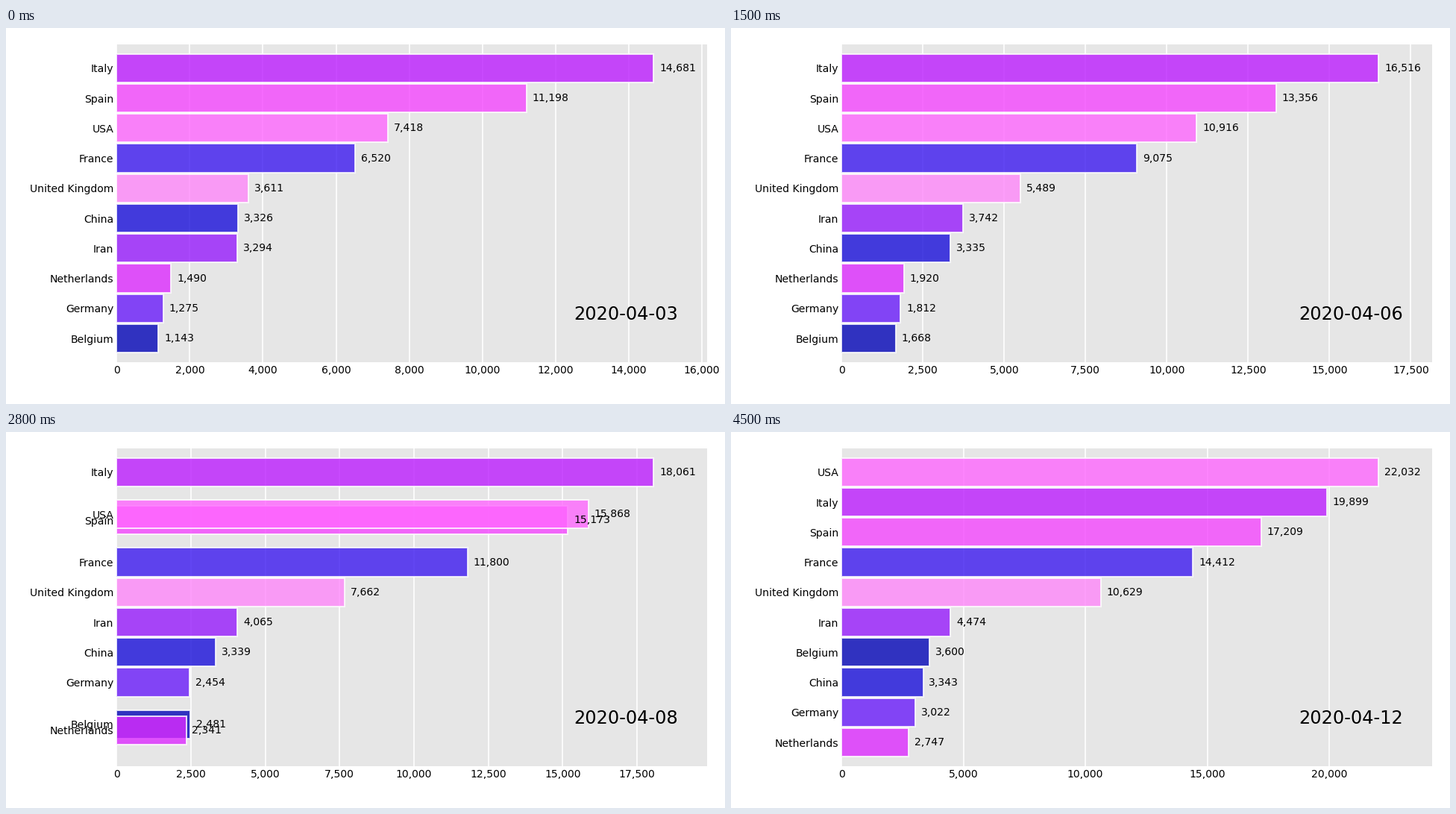
Write a matplotlib script that moves like this. It is 964 px wide and 504 px high and loops after 4550 ms.

```python
import numpy as np
import matplotlib.pyplot as plt
from matplotlib.animation import FuncAnimation
from matplotlib.ticker import FixedFormatter, StrMethodFormatter

WIDTH, HEIGHT, DPI = 964, 504, 144
DAYS, STEPS = 10, 10  # days shown, frames per day
FIRST_DAY = 3

# Name, bar colour, first and last value, bulge and swing of the growth curve.
COUNTRIES = [
    ("Belgium", "#0305b7", 1143, 3600, -264, -76),
    ("China", "#190fda", 3326, 3343, 3, 1),
    ("France", "#3c19f0", 6520, 14412, 199, -286),
    ("Germany", "#691cfa", 1275, 3022, 37, -89),
    ("Iran", "#961cfc", 3294, 4474, 50, 13),
    ("Italy", "#bc1dff", 14681, 19899, 131, -21),
    ("Netherlands", "#dc2bff", 1490, 2747, 49, -36),
    ("Spain", "#f446ff", 11198, 17209, 224, -46),
    ("USA", "#ff67ff", 7418, 22032, -1073, -513),
    ("United Kingdom", "#ff87fa", 3611, 10629, -424, -109),
]

# Day on which a country has climbed, and how many places.
CLIMBS = [
    (1, "Iran", 1), (4, "Belgium", 1), (5, "Germany", 2), (6, "USA", 1),
    (6, "Belgium", 1), (7, "Belgium", 1), (8, "USA", 1), (8, "Belgium", 1),
]

names = [row[0] for row in COUNTRIES]
colors = [row[1] for row in COUNTRIES]
count = len(names)
total = (DAYS - 1) * STEPS + 1


def growth(first, last, bulge, swing):
    """Daily values: a straight rise bent by two sine waves."""
    t = np.linspace(0, 1, DAYS)
    return (first + (last - first) * t
            + bulge * np.sin(np.pi * t) + swing * np.sin(2 * np.pi * t))


def daily_ranks(start_values):
    """Row of every country on every day; the top row is the highest."""
    order = [names[k] for k in np.argsort(start_values)]
    ranks = np.empty((count, DAYS))
    for day in range(DAYS):
        for when, name, places in CLIMBS:
            if when == day:
                spot = order.index(name)
                order.insert(spot + places, order.pop(spot))
        ranks[:, day] = [order.index(name) + 1 for name in names]
    return ranks


def at_frame(table, i):
    """Linear interpolation between days for every country."""
    keys = np.arange(DAYS) * STEPS
    return np.array([np.interp(i, keys, row) for row in table])


data = np.array([growth(*row[2:]) for row in COUNTRIES])
ranks = daily_ranks(data[:, 0])

fig = plt.figure(figsize=(6.6945, 3.5), dpi=DPI, facecolor="white")
left, right, top, bottom = 148.25, 940.42, 21.62, 448.2
ax = fig.add_axes([left / WIDTH, 1 - bottom / HEIGHT,
                   (right - left) / WIDTH, (bottom - top) / HEIGHT])
ax.set_facecolor("0.9")
ax.grid(True, axis="x", color="white", lw=0.8)
ax.set_axisbelow(True)
ax.tick_params(length=0, labelsize=7, pad=2)
ax.spines[:].set_visible(False)
ax.xaxis.set_major_formatter(StrMethodFormatter("{x:,.0f}"))

bars = ax.barh(ranks[:, 0], data[:, 0], height=0.95, color=colors,
               ec="white", lw=1, alpha=0.8)
labels = [ax.text(0, 1, "", size=7, ha="left", va="center") for _ in names]
date = ax.text(0.95, 0.15, "", size=12, ha="right", va="center",
               transform=ax.transAxes)
ax.set_ylim(0.2, count + 0.8)


def update(i):
    values, places = at_frame(data, i), at_frame(ranks, i)
    x_max = values.max() * 1.1
    ax.set_xlim(0, x_max)
    for bar, label, value, place in zip(bars, labels, values, places):
        bar.set_width(value)
        bar.set_y(place - bar.get_height() / 2)
        label.set_position((value + 0.01 * x_max, place))
        label.set_text(f"{value:,.0f}")
    ax.set_yticks(places)
    ax.yaxis.set_major_formatter(FixedFormatter(names))
    date.set_text(f"2020-04-{FIRST_DAY + i // STEPS:02d}")
    return [*bars, *labels, date]


anim = FuncAnimation(fig, update, frames=total, interval=50,
                     repeat=True, repeat_delay=0, blit=False)
plt.show()
```
